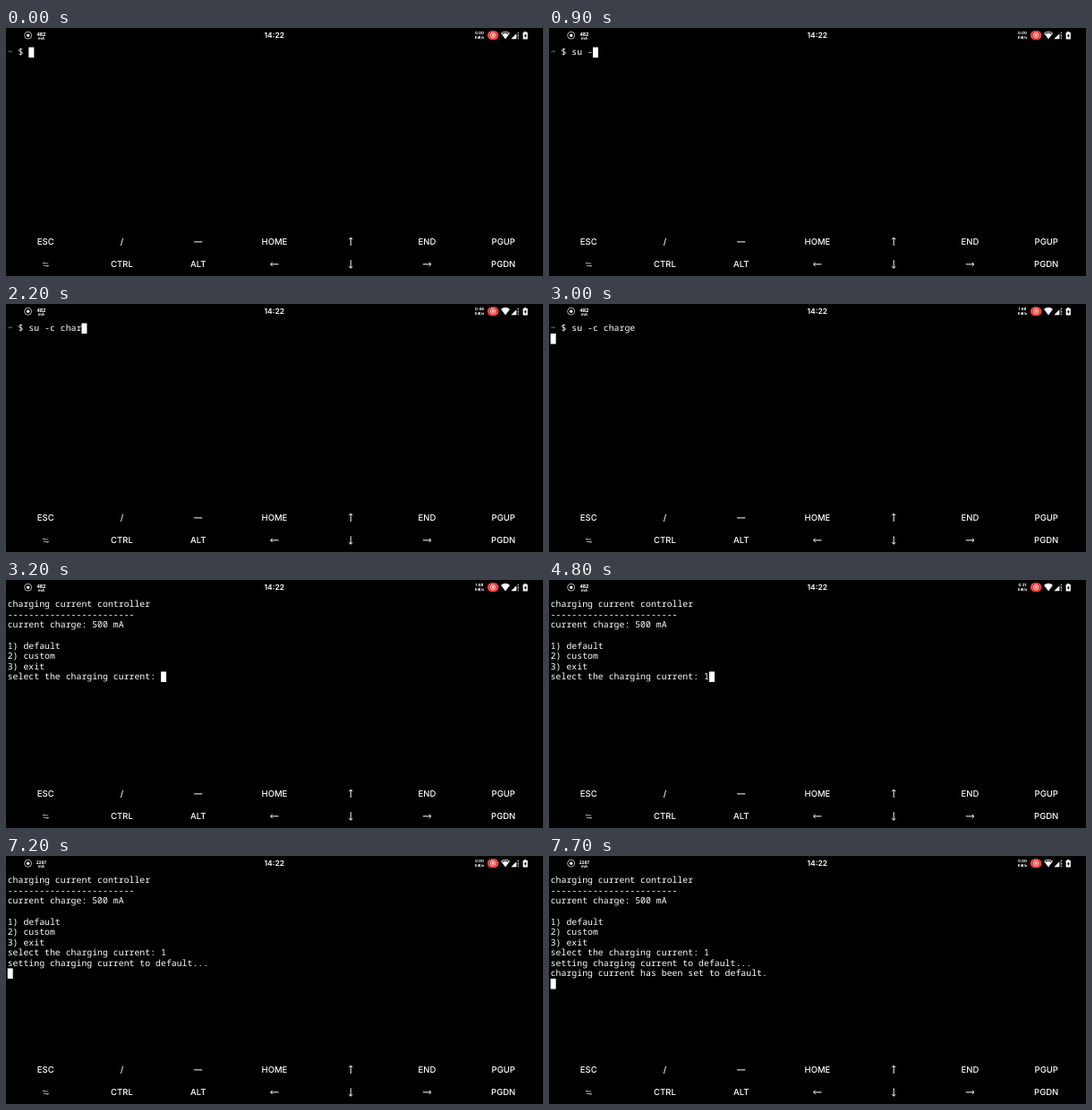
Animation of 600x277 px, one loop 8000 ms. Source, as an HTML page:

```html
<!DOCTYPE html>
<html lang="en">
<head>
<meta charset="utf-8">
<title>Charging current controller</title>
<style>
  html, body { margin: 0; width: 100%; height: 100%; overflow: hidden; background: #000; }
  svg { display: block; width: 100vw; height: 100vh; }
  text { fill: #fff; text-rendering: geometricPrecision; white-space: pre; }
  .term text { font: 9.85px "Noto Sans Mono", monospace; }
  .keys text { font: 500 9.5px Inter, sans-serif; text-anchor: middle; }
  .keys path { fill: none; stroke: #fff; stroke-width: 1; }
  .bar text { font: 700 4.4px Inter, sans-serif; text-anchor: middle; }
  .bar .clock { font: 600 8.5px Inter, sans-serif; }
  .bar .amps { font-family: "Open Sans", sans-serif; font-stretch: 75%; }
</style>
</head>
<body>
<svg viewBox="0 0 600 277">
  <rect width="600" height="277"/>
  <g class="bar">
    <circle cx="24.7" cy="8.2" r="4" fill="none" stroke="#ddd" stroke-width=".8"/>
    <circle cx="24.7" cy="8.2" r="1.7" fill="#fff"/>
    <text id="amps" class="amps" x="39.4" y="8.9"></text>
    <text class="amps" x="39.4" y="13" style="font-size:4.3px">mA</text>
    <text class="clock" x="299.8" y="11.2">14:22</text>
    <text id="speed" x="529" y="7.4"></text>
    <text x="529" y="11.5" style="font-size:4px">KiB/s</text>
    <rect x="537.8" y="2.9" width="12.6" height="10.4" rx="5.2" fill="#ea4440"/>
    <circle cx="544.1" cy="8.1" r="2.7" fill="none" stroke="#ffe4e0" stroke-width=".8"/>
    <circle cx="544.1" cy="8.1" r="1.3" fill="#ffe4e0"/>
    <path d="M553 5.8Q558 1.8 563 5.8L558 12.4Z" fill="#fff"/>
    <path id="gap" d="M554.6 6.4Q558 3.8 561.4 6.4" fill="none" stroke="#222" stroke-width="1.4"/>
    <path d="M564.4 12.3L573 3.8V12.3Z" fill="#2c2c2c"/>
    <path d="M564.4 12.3L570.2 6.5V12.3Z" fill="#fff"/>
    <path d="M572.4 4.6V6M572.4 7.6V9.6M572.4 11.2V12.3" stroke="#ddd" stroke-width=".9"/>
    <path d="M577.6 4.9H579V3.9H581.4V4.9H582.8V12.6H577.6Z" fill="#fff"/>
    <path d="M580.7 5.9L578.7 9.2H579.9V11.6L581.8 8.3H580.7Z" fill="#000"/>
  </g>
  <g class="term" id="term">
    <rect id="cursor" width="6" height="11.6" fill="#fff"/>
  </g>
  <g class="keys" id="keys"></g>
</svg>
<script>
const LOOP = 8000, CELL = 5.91, LINE = 11.55, LEFT = 1.7, TOP = 21.5;
const NS = "http://www.w3.org/2000/svg";
const byId = id => document.getElementById(id);

function add(parent, tag, attrs, content = "") {
  const el = document.createElementNS(NS, tag);
  for (const k in attrs) el.setAttribute(k, attrs[k]);
  el.textContent = content;
  return parent.appendChild(el);
}

// Last value whose start time has been reached
const valueAt = (steps, t) => steps.reduce((v, [at, x]) => t >= at ? x : v, steps[0][1]);

const PROMPT = "~ $ ", COMMAND = "su -c charge";
const KEY_TIMES = [100, 400, 600, 900, 1100, 1300, 1700, 1800, 2000, 2200, 2400, 2600];
const HEAD = ["charging current controller", "-".repeat(24), "current charge: 500 mA", ""];
const MENU = ["1) default", "2) custom", "3) exit", "select the charging current: "];
const SPEED = [[0, "0.00"], [1000, "0.12"], [2000, "0.46"], [3000, "1.68"],
  [4000, "0.31"], [5000, "0.24"], [6000, "0.20"], [7000, "0.00"]];
const AMPS = [[0, "482"], [7000, "2287"]];
const WEAK_WIFI = [[0, true], [1000, false], [7200, true]];

function linesAt(t) {
  if (t < 3100) {
    const typed = KEY_TIMES.filter(k => t >= k).length;
    const lines = [PROMPT + COMMAND.slice(0, typed)];
    if (t >= 3000) lines.push("");
    return lines;
  }
  if (t < 3200) return HEAD;
  const lines = HEAD.concat(MENU);
  if (t >= 4800) lines[7] += "1";
  if (t >= 5300) lines.push("setting charging current to default...");
  if (t >= 7700) lines.push("charging current has been set to default.");
  if (t >= 5300) lines.push("");
  return lines;
}

const BASE = TOP + 8.8;
const rows = Array.from({ length: 11 }, (_, i) =>
  add(byId("term"), "text", { x: LEFT, y: BASE + i * LINE }));
const tilde = add(byId("term"), "text", { x: LEFT, y: BASE, style: "fill:#a0a09c" }, "~");

const ARROWS = { up: 0, right: 90, down: 180, left: 270 };
const KEYS = [
  ["ESC", "/", "—", "HOME", "up", "END", "PGUP"],
  ["swap", "CTRL", "ALT", "left", "down", "right", "PGDN"]
];
KEYS.forEach((row, r) => row.forEach((key, c) => {
  const x = 44.2 + c * 85.25, y = 238.5 + r * 25.4;
  const icon = (d, turn = 0, style = "") => add(byId("keys"), "path",
    { d, transform: `translate(${x} ${y}) rotate(${turn})`, style });
  if (key in ARROWS) icon("M0 4.6V-4.2M-2 -2.3L0 -4.4L2 -2.3", ARROWS[key]);
  else if (key === "swap")
    icon("M3 -1H-3M-1.4 -2.3L-3 -1M-2.4 1.6H3.4M1.8 2.9L3.4 1.6", 0, "stroke-width:.8;stroke:#ccc");
  else if (key === "—") icon("M-4.6 .4H4.6");
  else add(byId("keys"), "text", { x, y: y + 3.4 }, key);
}));

function draw(t) {
  const lines = linesAt(t), last = lines.length - 1;
  const prompt = t < 3100;
  rows.forEach((row, i) => {
    const s = lines[i] || "";
    const skip = prompt && i === 0 ? 2 : 0;
    row.textContent = s.slice(skip);
    row.setAttribute("x", LEFT + skip * CELL);
  });
  tilde.style.display = prompt ? "" : "none";
  byId("cursor").setAttribute("x", LEFT + lines[last].length * CELL);
  byId("cursor").setAttribute("y", TOP + last * LINE);
  const amps = valueAt(AMPS, t);
  byId("amps").textContent = amps;
  byId("amps").style.fontSize = amps.length > 3 ? "5px" : "5.8px";
  byId("speed").textContent = valueAt(SPEED, t);
  byId("gap").style.display = valueAt(WEAK_WIFI, t) ? "" : "none";
}

const start = performance.now();
function tick() {
  draw((performance.now() - start) % LOOP);
  requestAnimationFrame(tick);
}
tick();
</script>
</body>
</html>
```
